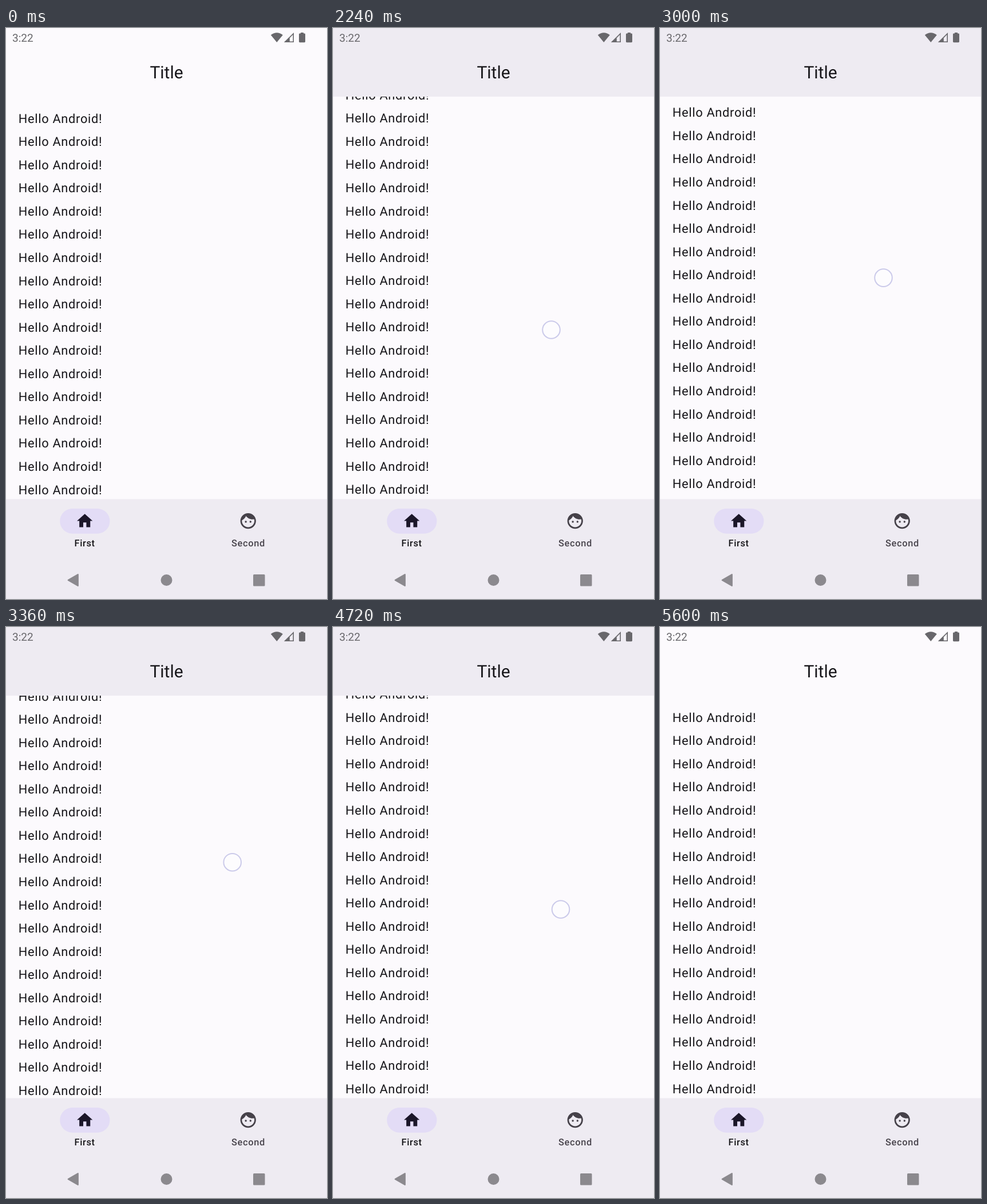
Animation, 561 px wide and 998 px high, one loop 5.64 s. Source, as an HTML page with a canvas:

```html
<!DOCTYPE html>
<html lang="en">
<head>
<meta charset="utf-8">
<title>Pinned top bar</title>
<style>
  html, body { margin: 0; width: 100%; height: 100%; overflow: hidden; background: #fcfafd; }
  canvas { display: block; width: 561px; height: 998px; }
</style>
</head>
<body>
<canvas id="stage"></canvas>
<script>
const W = 561, H = 998, LOOP = 5640, STEP = 40;
const DP = W / 411.43;
const BAR_BOTTOM = 120, NAV_TOP = 823.5;
const ROW = 40.55, FIRST_BASELINE = 165.7;
const SURFACE = [252, 250, 253], RAISED = [238, 235, 242];
const INK = '#161519', STATUS = '#68676b', SYSTEM = '#8b898e';

const canvas = document.getElementById('stage');
const ctx = canvas.getContext('2d');
const ratio = window.devicePixelRatio || 1;
canvas.width = W * ratio;
canvas.height = H * ratio;

const HOME = new Path2D('M10 20v-6h4v6h5v-8h3L12 3 2 12h3v8z');
const FACE = new Path2D(
  'M9 11.75a1.25 1.25 0 1 0 0 2.5a1.25 1.25 0 1 0 0-2.5z' +
  'M15 11.75a1.25 1.25 0 1 0 0 2.5a1.25 1.25 0 1 0 0-2.5z' +
  'M12 2a10 10 0 1 0 0 20a10 10 0 1 0 0-20z' +
  'M12 20c-4.41 0-8-3.59-8-8 0-.29.02-.58.05-.86 2.36-1.05 4.23-2.98 5.21-5.37' +
  'C11.07 8.33 14.05 10 17.42 10c.78 0 1.53-.09 2.25-.26.21.71.33 1.47.33 2.26 0 4.41-3.59 8-8 8z');

// Finger path: [ms, position]
const FINGER_X = [[1560, 385], [2240, 381.5], [2720, 387], [3000, 390.5], [3320, 395.5],
  [3720, 396.5], [4320, 396.5], [4720, 398], [4880, 405], [5520, 411]];
const FINGER_Y = [[1560, 581], [1700, 577], [2240, 527.5], [3000, 436.6], [3320, 412],
  [3720, 407], [3880, 406.7], [4320, 406.7], [4400, 412], [4720, 493.5],
  [5100, 568], [5240, 579], [5520, 584]];
const TOUCH_DOWN = 1560, TOUCH_UP = 5560;
const DRAG_START_Y = 570.3, SCROLL_LAG = 18;
const RAISE_AT = 1790, LOWER_AT = 5130;

// Monotone cubic through the keys
function sample(keys, t) {
  const last = keys.length - 1;
  if (t <= keys[0][0]) return keys[0][1];
  if (t >= keys[last][0]) return keys[last][1];
  const slope = i => (keys[i + 1][1] - keys[i][1]) / (keys[i + 1][0] - keys[i][0]);
  const tangent = i => {
    if (i === 0) return slope(0);
    if (i === last) return slope(last - 1);
    const a = slope(i - 1), b = slope(i);
    return a * b <= 0 ? 0 : 2 * a * b / (a + b);
  };
  let i = 0;
  while (t > keys[i + 1][0]) i++;
  const span = keys[i + 1][0] - keys[i][0], u = (t - keys[i][0]) / span;
  const u2 = u * u, u3 = u2 * u;
  return (2 * u3 - 3 * u2 + 1) * keys[i][1] + (u3 - 2 * u2 + u) * span * tangent(i) +
    (3 * u2 - 2 * u3) * keys[i + 1][1] + (u3 - u2) * span * tangent(i + 1);
}

// Critically damped spring from 0 to 1
function spring(ms) {
  const x = 20 * Math.max(0, ms) / 1000;
  return 1 - (1 + x) * Math.exp(-x);
}

const rgb = c => `rgb(${c.map(Math.round).join(',')})`;

function rect(x, y, w, h, color, radius = 0) {
  ctx.fillStyle = color;
  ctx.beginPath();
  ctx.roundRect(x, y, w, h, radius);
  ctx.fill();
}

function polygon(color, points, rounding = 0) {
  ctx.fillStyle = ctx.strokeStyle = color;
  ctx.beginPath();
  points.forEach(p => ctx.lineTo(...p));
  ctx.closePath();
  ctx.fill();
  if (!rounding) return;
  ctx.lineJoin = 'round';
  ctx.lineWidth = rounding;
  ctx.stroke();
}

function text(str, x, y, size, color, { spacing = 0, align = 'left', weight = 400 } = {}) {
  ctx.font = `${weight} ${size}px Roboto, sans-serif`;
  ctx.textRendering = 'geometricPrecision'; // keeps fractional advances
  ctx.letterSpacing = spacing + 'px';
  ctx.textAlign = align;
  ctx.fillStyle = color;
  ctx.fillText(str, x, y);
}

function icon(path, cx, cy, color) {
  ctx.save();
  ctx.translate(cx, cy);
  ctx.scale(DP, DP);
  ctx.translate(-12, -12);
  ctx.fillStyle = color;
  ctx.fill(path, 'evenodd');
  ctx.restore();
}

function drawList(scroll) {
  ctx.save();
  ctx.beginPath();
  ctx.rect(0, BAR_BOTTOM, W, NAV_TOP - BAR_BOTTOM);
  ctx.clip();
  const first = Math.max(0, Math.floor(scroll / ROW) - 1);
  for (let i = first; i < first + 21; i++) {
    text('Hello Android!', 16 * DP, FIRST_BASELINE + i * ROW - scroll, 16 * DP, INK, { spacing: 0.5 * DP });
  }
  ctx.restore();
}

function drawTopBar(raise) {
  const color = rgb(SURFACE.map((v, i) => v + (RAISED[i] - v) * raise));
  rect(0, 0, W, BAR_BOTTOM, color);
  text('Title', W / 2, 88, 22 * DP, INK, { align: 'center' });
  text('3:22', 11, 24, 14 * DP, STATUS);

  // Wi-Fi fan
  ctx.fillStyle = STATUS;
  ctx.beginPath();
  ctx.moveTo(473.3, 25);
  ctx.lineTo(462.8, 12.2);
  ctx.quadraticCurveTo(473.3, 4.4, 483.8, 12.2);
  ctx.closePath();
  ctx.fill();

  // Signal wedge and battery
  polygon(STATUS, [[485.8, 25], [503, 25], [503, 8]]);
  polygon(color, [[495.8, 17.4], [501.4, 11.8], [501.4, 23.5], [495.8, 23.5]]);
  rect(512, 9.6, 11, 15.6, STATUS, 1.4);
  rect(515, 8, 5, 3, STATUS);
}

function drawBottomBar() {
  rect(0, NAV_TOP, W, H - NAV_TOP, rgb(RAISED));
  rect(94.2, 840, 64 * DP, 32 * DP, '#e3dcf6', 16 * DP);
  icon(HOME, 137.7, 861.6, '#1b1629');
  icon(FACE, 423.2, 861.6, '#454149');
  const label = { spacing: 0.5 * DP, align: 'center', weight: 500 };
  text('First', 137.6, 906.2, 12 * DP, INK, label);
  text('Second', 423.4, 906.2, 12 * DP, '#47434b', label);

  polygon(SYSTEM, [[108.8, 965], [125.7, 955.2], [125.7, 974.8]], 2.4);
  rect(270.5, 955, 20, 20, SYSTEM, 10);
  rect(432, 955, 20.5, 20.5, SYSTEM, 1.5);
}

function drawTouch(t) {
  if (t < TOUCH_DOWN || t >= TOUCH_UP) return;
  ctx.beginPath();
  ctx.arc(sample(FINGER_X, t), sample(FINGER_Y, t), 15.3, 0, Math.PI * 2);
  ctx.fillStyle = 'rgba(255,255,255,.4)';
  ctx.fill();
  ctx.lineWidth = 2;
  ctx.strokeStyle = t < TOUCH_DOWN + STEP ? '#d0cee0' : '#cbcaea';
  ctx.stroke();
}

function draw(t) {
  ctx.setTransform(ratio, 0, 0, ratio, 0, 0);
  rect(0, 0, W, H, rgb(SURFACE));
  const scroll = t < TOUCH_DOWN ? 0 : Math.max(0, DRAG_START_Y - sample(FINGER_Y, t - SCROLL_LAG));
  drawList(scroll);
  drawTopBar(spring(t - RAISE_AT) - spring(t - LOWER_AT));
  drawBottomBar();
  drawTouch(t);
}

const start = performance.now();
function tick() {
  const t = (performance.now() - start) % LOOP;
  draw(Math.floor(t / STEP) * STEP);
  requestAnimationFrame(tick);
}
tick();
</script>
</body>
</html>
```
